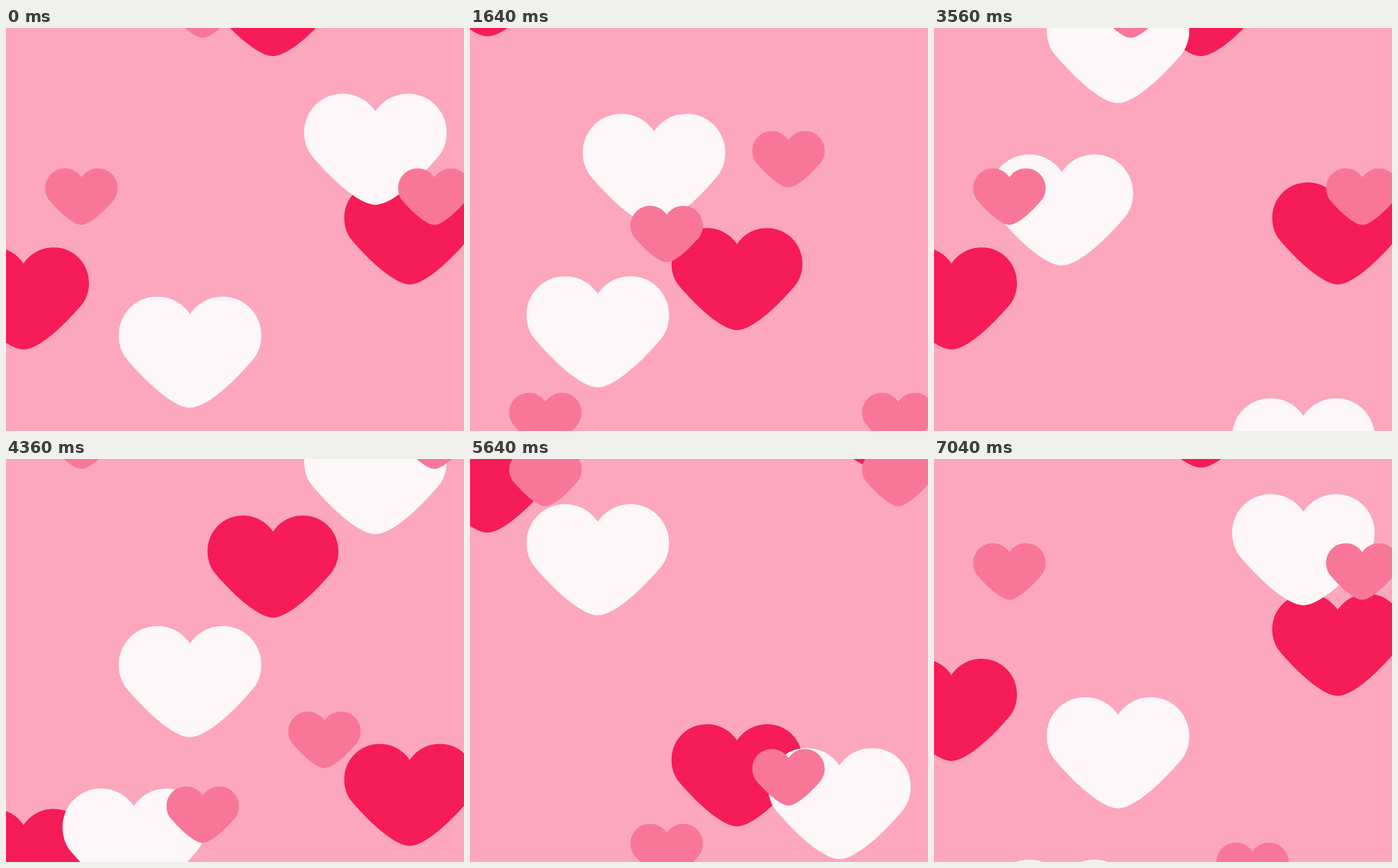
An HTML page that plays this animation: 797x702 px, repeating every 7080 ms.

```html
<!DOCTYPE html>
<html lang="en">
<head>
<meta charset="utf-8">
<title>Falling hearts</title>
<style>
  html, body { margin: 0; width: 100%; height: 100%; overflow: hidden; background: #fca7be; }
  svg { display: block; width: 100%; height: 100%; }
</style>
</head>
<body>
<svg id="stage" viewBox="0 0 797 702" preserveAspectRatio="none">
  <defs>
    <path id="heart" d="M0 30.5
      C-13 11.5 -33 0 -57 0 C-94.5 0 -124 30 -124 67.5 C-124 83.5 -119 98 -110 109
      C-70.5 155.5 -26 193.5 0 193.5 C26 193.5 70.5 155.5 110 109
      C119 98 124 83.5 124 67.5 C124 30 94.5 0 57 0 C33 0 13 11.5 0 30.5Z"/>
  </defs>
</svg>
<script>
  const SVG = "http://www.w3.org/2000/svg";
  const LOOP = 7080, TICK = 40;

  // Back to front. Each layer falls `travel` px in `ticks` ticks, wrapping off stage at `start`.
  // hearts: [centre x, top y at time zero]
  const layers = [
    { fill: "#f61c58", scale: 0.919, travel: 1022.7, ticks: 90, start: -200,
      hearts: [[30.5, 382.2], [464.6, -128.8], [702.5, 268.9]] },
    { fill: "#fdf7f9", scale: 1, travel: 1061.3, ticks: 60, start: -230,
      hearts: [[320.2, 468], [642.8, 114.4], [222.4, 751]] },
    { fill: "#f87799", scale: 0.508, travel: 977.4, ticks: 30, start: -150,
      hearts: [[131.2, 244.6], [342.3, -81.2], [554.2, 765.9], [745.3, 244.6]] }
  ];

  const stage = document.getElementById("stage");
  const hearts = layers.flatMap(layer => layer.hearts.map(([x, y]) => {
    const node = document.createElementNS(SVG, "use");
    node.setAttribute("href", "#heart");
    node.setAttribute("fill", layer.fill);
    stage.append(node);
    return { node, layer, x, y };
  }));

  const wrap = (value, size) => ((value % size) + size) % size;

  function draw(now) {
    const t = now % LOOP;
    // The opening pose is held for two ticks, then the fall catches up.
    const tick = t < 2 * TICK ? 0 : Math.floor(t / TICK) + 1;
    for (const { node, layer, x, y } of hearts) {
      const { scale, travel, ticks, start } = layer;
      const top = start + wrap(y - start + tick * travel / ticks, travel);
      node.setAttribute("transform", `translate(${x} ${top.toFixed(2)}) scale(${scale})`);
    }
  }

  function loop() {
    draw(performance.now());
    requestAnimationFrame(loop);
  }
  loop();
</script>
</body>
</html>
```
